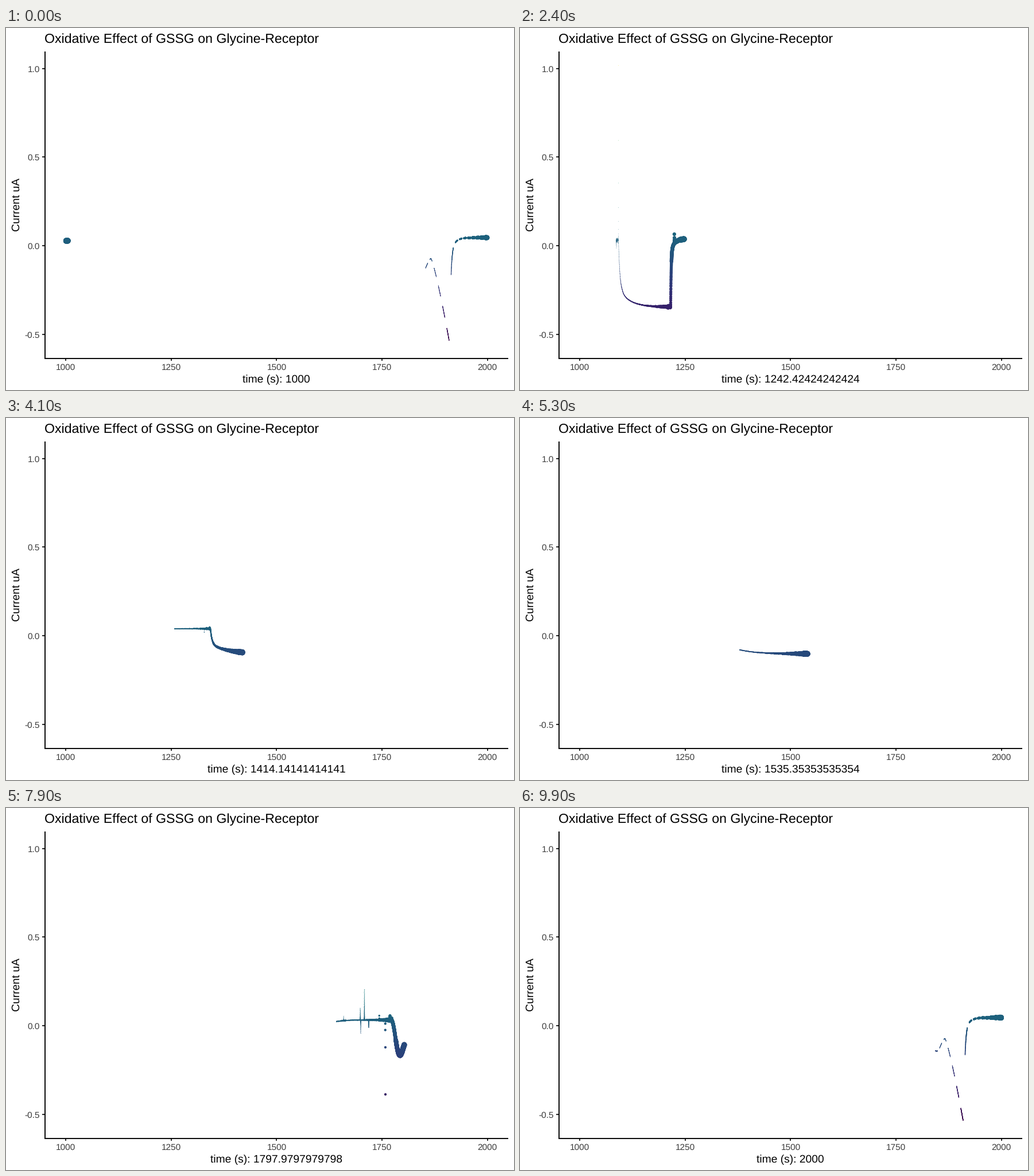
Animation of 885x632 px, one loop 10000 ms. Source, as a matplotlib script:

```python
import numpy as np
import matplotlib.pyplot as plt
from matplotlib.animation import FuncAnimation

W, H, DPI = 885, 632, 100
FRAMES, INTERVAL = 100, 100
WAKE = 15
STEP = 1000 / (FRAMES - 1)
RATE = 20  # samples per second
I_MIN, I_MAX = -0.556, 1.018
PX = 72 / DPI

plt.rcParams.update({
    "font.family": "Liberation Sans",
    "text.hinting": "none",
    "text.kerning_factor": 6,
    "axes.unicode_minus": False,
})


def px(t):
    return 104.4 + (t - 1000) * 0.7341


def py(i):
    return 380.2 - i * 309.5


def relax(t, onset, delta, tau):
    """Exponential approach to a new level."""
    return delta * (1 - np.exp(-np.maximum(t - onset, 0) / tau))


def progress(t, start, end):
    return np.clip((t - start) / (end - start), 0, 1)


def glide(t, start, end, delta):
    return delta * (1 - np.cos(np.pi * progress(t, start, end))) / 2


def base_current(t):
    i = 0.028 + 0.004 * progress(t, 1000, 1090)
    # each change of solution: a fast step, then a slow drift
    i += relax(t, 1091.5, -.302, 3.5) + relax(t, 1100, -.075, 25)
    i += relax(t, 1215.3, .33, 1.3) + relax(t, 1217, .055, 10)
    i += relax(t, 1343, -.092, 3.5) + relax(t, 1348, -.05, 40)
    i += relax(t, 1603, .085, 3) + relax(t, 1608, .05, 20)
    # last, wavering response and recovery
    i += glide(t, 1772, 1792, -.2) + glide(t, 1792, 1808, .077)
    i += glide(t, 1808, 1847, -.053) + glide(t, 1847, 1866.5, .07)
    i -= .483 * progress(t, 1866.5, 1911) ** 1.22
    i += relax(t, 1911.2, .55, 2.35) + relax(t, 1917, .052, 10)
    return i


def noise_level(t):
    """Noise builds up towards every change of solution."""
    dev = np.full(t.shape, .001)
    for change, level in ((1091.5, .008), (1215, .003), (1343, .0025),
                          (1603, .003), (1665, .002), (1773, .003)):
        dev += level * np.exp((t - change) / 15) * (t < change)
    return dev


# Electrical artefacts: (time, height, decay per sample)
SPIKES = [(1085.5, .036, .1), (1086.5, -.045, .1), (1091.5, .985, .56),
          (1224.2, .052, .5), (1328.5, -.019, 1), (1341, .01, .1),
          (1577.6, .02, .1), (1659, .026, .1), (1698.5, .066, .07),
          (1699.6, -.075, .07), (1708.4, .17, .05), (1718.6, -.042, .1),
          (1743.5, .024, 1), (1758, -.42, 1), (1769, .024, .1)]


def record():
    rng = np.random.default_rng(4)
    t = np.arange(1000, 2000 + .5 / RATE, 1 / RATE)
    i = base_current(t) + noise_level(t) * rng.standard_normal(t.size)
    for when, height, decay in SPIKES:
        burst = height * np.exp(-decay * np.arange(4 / decay))
        t = np.r_[t, when + .15 * rng.standard_normal(burst.size)]
        i = np.r_[i, base_current(np.float64(when)) + burst]
    order = np.argsort(t, kind="stable")
    return t[order], np.clip(i[order], I_MIN, I_MAX)


time, current = record()
place = (time - 1000) / STEP
slot = np.floor(place + 0.5).astype(int)
sparse = ((slot >= 84) | (slot == 1)) & (place - slot > 0.02)
xy = np.column_stack([px(time), py(current)])
colors = plt.get_cmap("viridis")((current - I_MIN) / (I_MAX - I_MIN))
colors[:, :3] **= 1.22  # darker display gamma

fig = plt.figure(figsize=(W / DPI, H / DPI), dpi=DPI, facecolor="white")
ax = fig.add_axes([0, 0, 1, 1])
ax.set(xlim=(0, W), ylim=(H, 0))
ax.axis("off")


def label(x, y, text, size, color="black", **kw):
    return ax.text(x, y, text, fontsize=size * PX, color=color,
                   va="baseline", **kw)


def line(xs, ys, color="black"):
    ax.plot(xs, ys, color=color, lw=1.9 * PX, solid_capstyle="butt", zorder=3)


LEFT, RIGHT, TOP, BOTTOM = 67.7, 875.2, 40.5, 576.5
TICK, TICK_TEXT = "#222222", "#3b3b3b"

for v in range(1000, 2001, 250):
    line([px(v)] * 2, [BOTTOM, BOTTOM + 4.9], TICK)
    label(px(v), 596.8, str(v), 15.4, TICK_TEXT, ha="center")
for v in (-0.5, 0, 0.5, 1):
    line([LEFT - 4.9, LEFT], [py(v)] * 2, TICK)
    label(59, py(v) + 5.7, f"{v:.1f}", 15.4, TICK_TEXT, ha="right")
line([LEFT, LEFT], [TOP, BOTTOM + 0.9])
line([LEFT - 0.9, RIGHT], [BOTTOM, BOTTOM])

label(67.2, 26.6, "Oxidative Effect of GSSG on Glycine-Receptor", 23.12)
label(23.8, 308.5, "Current uA", 19.3, ha="center", rotation=90,
      rotation_mode="anchor")
clock = label(471.2, 619, "", 19.3, ha="center")
dots = ax.scatter([], [], linewidths=0, zorder=2)


def draw(frame):
    age = (frame - slot) % FRAMES
    shown = np.flatnonzero((age <= WAKE) & ~(sparse & (age > 0)))
    shown = shown[np.argsort(-age[shown], kind="stable")]
    diameter = 0.7 + 8.4 * (1 - age[shown] / (WAKE + 1)) ** 3
    dots.set_offsets(xy[shown])
    dots.set_sizes((diameter * PX) ** 2)
    dots.set_facecolor(colors[shown])
    clock.set_text(f"time (s): {1000 + frame * STEP:.15g}")
    return dots, clock


anim = FuncAnimation(fig, draw, frames=FRAMES, interval=INTERVAL,
                     init_func=lambda: draw(0), repeat=True, repeat_delay=0)
plt.show()
```
